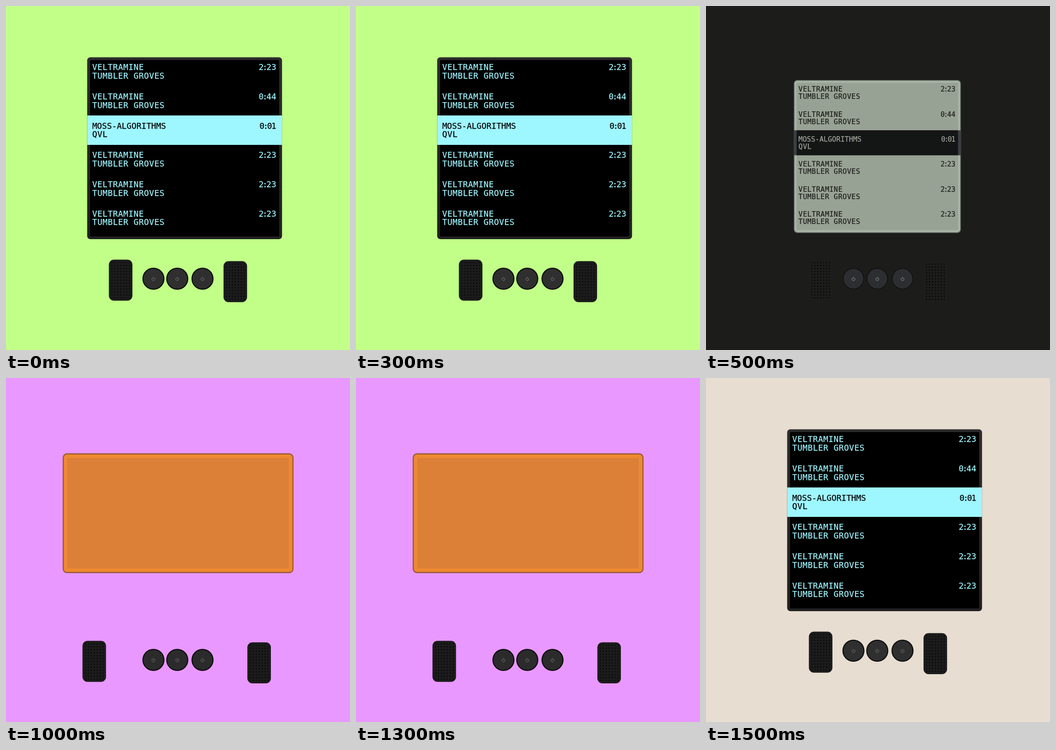
An HTML page that plays this animation: 748 px wide and 748 px high, repeating every 1.55 s.

```html
<!DOCTYPE html>
<html lang="en">
<head>
<meta charset="utf-8">
<title>Player skins</title>
<style>
  html, body { margin: 0; width: 100%; height: 100%; overflow: hidden; background: #c1ff88; }
  svg { display: block; width: 748px; height: 748px; }
  text {
    font: 17.8px "DejaVu Sans Mono", monospace;
    letter-spacing: .55px;
    white-space: pre;
    fill: currentColor;
    stroke: currentColor;
    stroke-width: .25px;
  }
  .time { text-anchor: end; letter-spacing: 0; }
  .active { letter-spacing: 0; }

  #bg, .scene { animation: 1550ms step-end infinite; }
  #bg { animation-name: backdrop; }
  #neon { animation-name: neon; }
  #lcd { animation-name: lcd; }
  #amber { animation-name: amber; }

  @keyframes backdrop {
    0% { fill: #c1ff88; }
    32.258% { fill: #1c1c1a; }
    64.516% { fill: #e998ff; }
    96.774%, 100% { fill: #e7ddd1; }
  }
  @keyframes neon {
    0% { visibility: visible; }
    32.258% { visibility: hidden; }
    96.774%, 100% { visibility: visible; }
  }
  @keyframes lcd {
    0% { visibility: hidden; }
    32.258% { visibility: visible; }
    64.516%, 100% { visibility: hidden; }
  }
  @keyframes amber {
    0% { visibility: hidden; }
    64.516% { visibility: visible; }
    96.774%, 100% { visibility: hidden; }
  }
</style>
</head>
<body>
<svg viewBox="0 0 748 748">
  <defs>
    <linearGradient id="bezel" x2="0" y2="1">
      <stop stop-color="#2c2c2c"/><stop offset="1" stop-color="#202020"/>
    </linearGradient>
    <pattern id="holes" width="6.4" height="6.4" patternUnits="userSpaceOnUse">
      <circle cx="3.2" cy="3.2" r="1.65" fill="#0a0a0a"/>
    </pattern>
    <path id="power" d="M-2.2-2.3A3.4 3.4 0 1 0 2.2-2.3M0-4V-.4" fill="none" stroke-width=".9" stroke-linecap="round"/>
  </defs>
  <rect id="bg" width="748" height="748" fill="#c1ff88"/>
  <g id="neon" class="scene"></g>
  <g id="lcd" class="scene"></g>
  <g id="amber" class="scene"></g>
</svg>
<script>
const ROW = 63.66, ACTIVE = 2;
const song = { title: 'VELTRAMINE', artist: 'TUMBLER GROVES', time: '2:23' };
const tracks = [
  song,
  { ...song, time: '0:44' },
  { title: 'MOSS-ALGORITHMS', artist: 'QVL', time: '0:01' },
  song, song, song
];

// Rectangle from its left, top, right and bottom edges
const box = (l, t, r, b, fill, rx = 0, extra = '') =>
  `<rect x="${l}" y="${t}" width="${r - l}" height="${b - t}" rx="${rx}" fill="${fill}" ${extra}/>`;

// Digits sit close to the colon, and a final 1 is narrow
const kern = time => `0 -2.4 -2.4 ${time.endsWith('1') ? -1.6 : 0}`;

const playlist = (ink, activeInk) => tracks.map((track, i) => {
  const y = 139.2 + i * ROW, on = i === ACTIVE;
  return `<g color="${on ? activeInk : ink}">
    <text x="187.4" y="${y}" class="${on ? 'active' : ''}">${track.title}</text>
    <text x="187.4" y="${y + 18.8}">${track.artist}</text>
    <text x="587.6" y="${y}" class="time" dx="${kern(track.time)}">${track.time}</text>
  </g>`;
}).join('');

const speaker = (x, y, fill) => `<g transform="translate(${x} ${y})">
  ${box(0, 0, 51.2, 89.2, fill, 11)}
  <g transform="translate(3.4 3.2)">${box(0, 0, 44.8, 83.2, 'url(#holes)')}</g>
</g>`;

const knob = (x, y, { face, rim, r, icon }) => `<g transform="translate(${x} ${y})">
  <circle r="${r}" fill="${rim}"/>
  <circle r="21.7" fill="${face}"/>
  <use href="#power" y=".5" stroke="${icon}"/>
</g>`;

const controls = (left, right, y, body, look) =>
  speaker(left, y - 41.4, body) + speaker(right, y - 38.2, body) +
  [320.6, 372.4, 427.3].map(x => knob(x, y, look)).join('');

const show = (id, markup) => document.getElementById(id).innerHTML = markup;

show('neon',
  box(176.5, 111.5, 600.2, 507, 'url(#bezel)', 7) +
  box(182.8, 117.5, 594, 501, '#000', 2) +
  box(176.5, 238, 600.2, 302, '#a3f3fb') +
  box(182.8, 238, 594, 302, '#9ef6ff') +
  playlist('#9ef6ff', '#000') +
  controls(223.7, 473, 593, '#1c1c1c', { face: '#2f2f2f', rim: '#0c0c0c', r: 24, icon: '#808080' }));

show('lcd',
  box(191.5, 161.5, 553.7, 492.9, '#a6b1a3', 7, 'stroke="#525a51" stroke-width="1.5"') +
  box(197, 167.3, 548, 487, '#98a294', 2) +
  box(191, 270.3, 554.2, 324.5, '#3b3e43') +
  box(197, 270.3, 548, 324.5, '#141616') +
  `<g transform="translate(41.2 67.7) scale(.853)">${playlist('#1c1d1b', '#a0a89d')}</g>` +
  controls(223.7, 473, 593, '#1d1d1b', { face: '#2d2e31', rim: '#0b0b0b', r: 22.9, icon: '#a0a0a0' }));

show('amber',
  box(124.5, 165, 624, 423, '#ee8931', 8, 'stroke="#955930" stroke-width="2.4"') +
  box(133.3, 174, 615, 414, '#dc7f37', 2) +
  controls(166.3, 524.8, 613, '#1c1c1c', { face: '#2b2b2b', rim: '#0c0c0c', r: 24, icon: '#808080' }));
</script>
</body>
</html>
```
